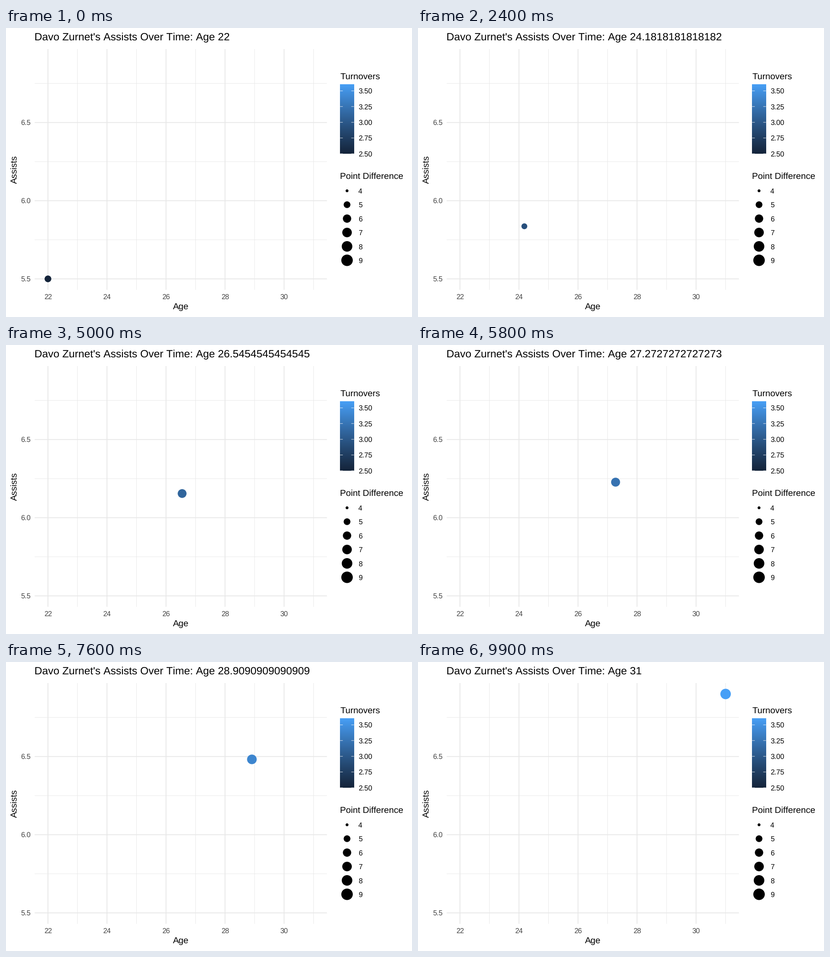
Animation of 885 by 632 pixels, one loop 10 s. Source, as a matplotlib script:

```python
import numpy as np
import matplotlib.pyplot as plt
from matplotlib.animation import FuncAnimation
from matplotlib.patches import Circle

W, H, DPI = 885, 632, 100
PX = 72 / DPI                 # points per pixel
STEPS = 11                    # tween steps per year of age
FRAMES = 9 * STEPS + 1

plt.rcParams.update({
    "font.family": "Liberation Sans",
    "text.hinting": "none",
    "text.kerning_factor": 10,
})

# Season data
AGES = np.arange(22, 32)
ASSISTS = [5.5, 5.6, 5.8, 6.0, 6.1, 6.2, 6.3, 6.5, 6.7, 6.9]
TURNOVERS = [2.5, 2.8, 2.9, 3.0, 3.0, 3.2, 3.3, 3.4, 3.5, 3.6]
POINT_DIFF = [5.0, 5.8, 4.9, 4.0, 6.9, 6.0, 8.1, 7.0, 9.0, 7.9]

LEFT, RIGHT, TOP, BOTTOM = 62.5, 699.5, 46, 572.5
GRID, TICK_TEXT = "#E8E8E8", "#444444"
TITLE, HEAD, LABEL = 23.2, 19.36, 15.5


def px_x(age):
    return 91.45 + (age - 22) * 64.34


def px_y(assists):
    return 548.6 - (assists - 5.5) * 341.9


def radius(diff):
    """Area scale: sizes grow with the square root of the value."""
    return 3.13 + 9.39 * np.sqrt((np.asarray(diff) - 4) / 5)


# Colour gradient interpolated in CIE Lab
TO_XYZ = np.array([[0.4124, 0.3576, 0.1805],
                   [0.2126, 0.7152, 0.0722],
                   [0.0193, 0.1192, 0.9505]])
WHITE = TO_XYZ.sum(axis=1)
TO_LAB = np.array([[0, 116, 0], [500, -500, 0], [0, 200, -200]])


def rgb_to_lab(rgb):
    c = np.array(rgb) / 255
    lin = np.where(c > 0.04045, ((c + 0.055) / 1.055) ** 2.4, c / 12.92)
    t = TO_XYZ @ lin / WHITE
    f = np.where(t > 0.008856, np.cbrt(t), 7.787 * t + 16 / 116)
    return TO_LAB @ f


def lab_to_rgb(lab):
    f = np.linalg.solve(TO_LAB, lab)
    t = np.where(f > 0.2069, f ** 3, (f - 16 / 116) / 7.787)
    lin = np.clip(np.linalg.solve(TO_XYZ, t * WHITE), 0, 1)
    c = np.where(lin > 0.0031308, 1.055 * lin ** (1 / 2.4) - 0.055, 12.92 * lin)
    return np.clip(c, 0, 1)


LOW, HIGH = rgb_to_lab((20, 36, 58)), rgb_to_lab((71, 159, 246))


def shade(turnovers):
    t = (turnovers - 2.5) / 1.1
    return lab_to_rgb(LOW + (HIGH - LOW) * t)


fig = plt.figure(figsize=(W / DPI, H / DPI), dpi=DPI, facecolor="white")
ax = fig.add_axes([0, 0, 1, 1])
ax.axis("off")


def text(x, y, s, size, color="black", **kw):
    return ax.text(x, y, s, fontsize=size * PX, color=color,
                   va="baseline", **kw)


def line(xs, ys, width, color=GRID, z=1):
    ax.plot(xs, ys, color=color, lw=width * PX, solid_capstyle="butt",
            snap=False, zorder=z)


def draw_panel():
    for age in AGES:
        x = px_x(age)
        major = age % 2 == 0
        line([x, x], [TOP, BOTTOM], 1.88 if major else 0.94)
        if major:
            text(x, 592.6, str(age), LABEL, TICK_TEXT, ha="center")
    for k in range(6):
        value = 5.5 + k / 4
        y = px_y(value)
        major = k % 2 == 0
        line([LEFT, RIGHT], [y, y], 1.88 if major else 0.94)
        if major:
            text(53.8, y + 5.6, f"{value:.1f}", LABEL, TICK_TEXT, ha="right")
    text((LEFT + RIGHT) / 2, 615, "Age", HEAD, ha="center")
    ax.text(24, (TOP + BOTTOM) / 2, "Assists", fontsize=HEAD * PX,
            rotation=90, rotation_mode="anchor", ha="center", va="baseline")


def draw_legends():
    x0, x1, y0, y1 = 728.2, 758.6, 123.3, 275.0
    text(x0, 112, "Turnovers", HEAD)
    ramp = np.array([[shade(v)] for v in np.linspace(3.6, 2.5, 300)])
    ax.imshow(ramp, extent=(x0, x1, y1, y0), aspect="auto", zorder=2)
    for v in np.arange(2.5, 3.6, 0.25):
        y = y1 - (v - 2.5) * 137.6
        line([x0, x0 + 6], [y, y], 0.8, "white", 3)
        line([x1 - 6, x1], [y, y], 0.8, "white", 3)
        text(768, y + 5.6, f"{v:.2f}", LABEL)

    text(x0, 330, "Point Difference", HEAD)
    for k in range(6):
        y = 356 + 30.4 * k
        ax.add_patch(Circle((743.4, y), radius(4 + k), color="black", lw=0))
        text(768, y + 5.8, str(4 + k), LABEL)


draw_panel()
draw_legends()
title = text(LEFT, 27, "", TITLE)
dot = ax.add_patch(Circle((0, 0), 1, lw=0, zorder=5))
ax.set_xlim(0, W)
ax.set_ylim(H, 0)

RADII = radius(POINT_DIFF)


def update(i):
    age = 22 + i / STEPS
    title.set_text(f"Davo Zurnet's Assists Over Time: Age {age:.15g}")
    dot.center = px_x(age), px_y(np.interp(age, AGES, ASSISTS))
    dot.set_radius(np.interp(age, AGES, RADII))
    dot.set_facecolor(shade(np.interp(age, AGES, TURNOVERS)))
    return title, dot


anim = FuncAnimation(fig, update, frames=FRAMES, interval=100,
                     repeat=True, repeat_delay=0, blit=False)
plt.show()
```
